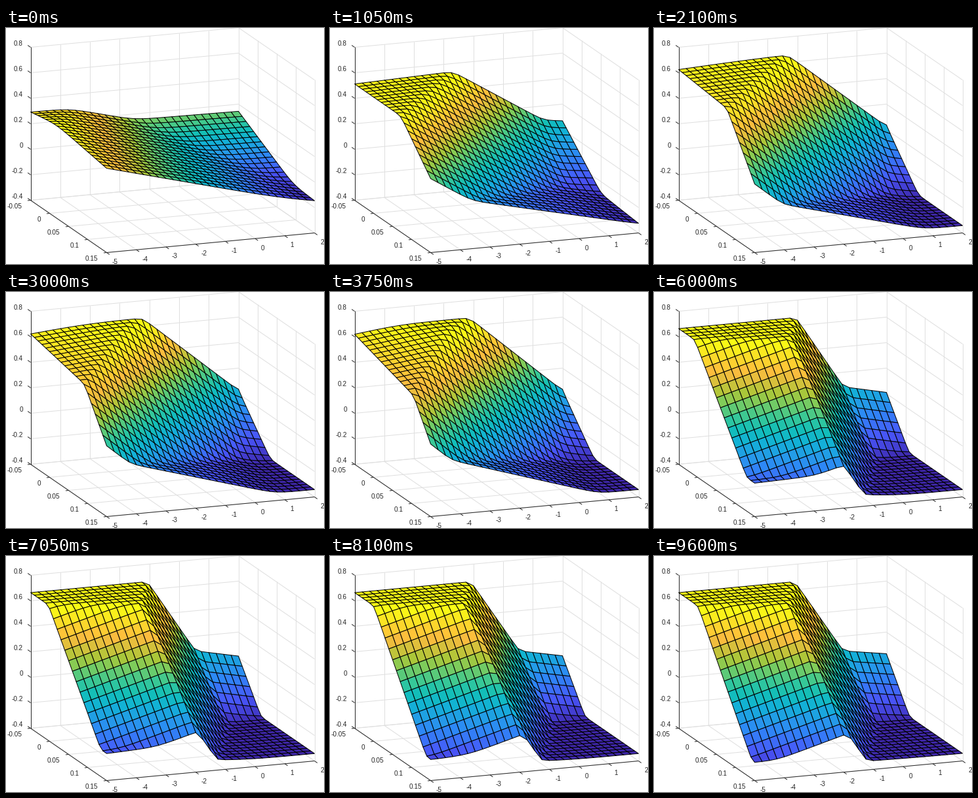
Write a matplotlib script that moves like this. It is 485 px wide and 361 px high and loops after 9.75 s.

```python
import matplotlib.pyplot as plt
import numpy as np
from matplotlib.animation import FuncAnimation
from matplotlib.collections import LineCollection, PolyCollection
from matplotlib.colors import LinearSegmentedColormap

W, H, DPI = 485, 361, 64
PX = 72 / DPI
TICK = 50
LOOP = 9750
DARK = "#262626"

PARULA = LinearSegmentedColormap.from_list("parula", [
    (0, (.2422, .1504, .6603)), (1 / 7, (.2810, .3228, .9579)),
    (1 / 6, (.2780, .3556, .9777)), (2 / 7, (.1786, .5289, .9682)),
    (1 / 3, (.1540, .5902, .9218)), (3 / 7, (.0689, .6948, .8394)),
    (1 / 2, (.0704, .7457, .7258)), (4 / 7, (.2161, .7843, .5923)),
    (2 / 3, (.5044, .7993, .3480)), (5 / 7, (.6720, .7793, .2227)),
    (5 / 6, (.9871, .7348, .2438)), (6 / 7, (.9970, .7659, .2199)),
    (1, (.9769, .9839, .0805))])

# The surface is a soft min/max of planes a + b*u + c*v, with
# u = x + 5, v = (y + 0.05) / 0.2 and height measured from z = -0.4.
# Rows: left face, its foot, right face, back patch, front slope.
FLOOR, TOP = .058, 1.064
SHARP = 75
STAGES = [
    (0, [(.692, -.002, .128), (.25, .006, 0), (.771, -.062, -.11),
         (.565, -.003, -.386), (.544, -.038, -.027)]),
    (12, [(1.026, .012, -.07), (.25, .006, 0), (1.754, -.19, -1.216),
          (.711, -.04, -.88), (.507, -.0625, -.09)]),
    (23, [(1.02, .03, -.21), (.25, .006, 0), (1.846, -.203, -1.277),
          (.783, -.051, -.88), (.558, -.074, -.08)]),
    (30, [(.995, .04, -.446), (.25, .006, 0), (2.246, -.286, -1.363),
          (.767, -.051, -.88), (.643, -.099, -.1)]),
    (38, [(1.312, .065, -1.17), (.262, .006, 0), (2.485, -.36, -1.067),
          (.774, -.052, -1.18), (.2, -.03, 0)]),
    (52, [(1.392, .065, -1.3), (.16, .012, 0), (2.448, -.354, -1.05),
          (.751, -.048, -1.2), (.15, -.022, 0)]),
    (62, [(1.396, .065, -1.3), (.142, 0, 0), (2.448, -.354, -1.04),
          (.69, -.037, -1.22), (.1, -.01, 0)]),
]
STEPS = np.array([s for s, _ in STAGES])
PLANES = np.array([p for _, p in STAGES])

# far cells first, so that near ones cover them
U, V = np.meshgrid(np.linspace(7, 0, 29), np.linspace(0, 1, 21))


def project(x, y, z):
    u, v = x + 5, (y + .05) / .2
    return np.stack([37 + 317 / 7 * u + 116 * v,
                     263 - 30 / 7 * u + 80 * v - 195 * (z + .4)], axis=-1)


def smax(*parts):
    full = np.broadcast_arrays(*parts)
    return np.logaddexp.reduce(np.array(full) * SHARP, axis=0) / SHARP


def smin(*parts):
    return -smax(*[-p for p in parts])


def step_at(ms):
    if ms < 600:
        return int(ms >= 400)
    return 2 + (ms - 600) // 150


def planes_at(step):
    k = min(np.searchsorted(STEPS, step, side="right") - 1, len(STEPS) - 2)
    t = (step - STEPS[k]) / (STEPS[k + 1] - STEPS[k])
    if k == 0:
        t = 1 - (1 - t) ** 2
    return PLANES[k] * (1 - t) + PLANES[k + 1] * t


def surface(step):
    left, foot, right, back, front = (
        a + b * U + c * V for a, b, c in planes_at(step))
    hill = smin(TOP + 0 * U, smax(left, foot), right)
    return smax(hill, back, front, FLOOR) - .4


def draw_axes(ax):
    xs = np.arange(-5, 3)
    ys = np.linspace(-.05, .15, 5)
    zs = np.linspace(-.4, .8, 7)

    def lines(ends, color, z):
        segs = [[project(*p) for p in e] for e in ends]
        ax.add_collection(LineCollection(
            segs, colors=color, linewidths=PX, zorder=z))

    grid = []
    for x in xs:
        grid += [[(x, .15, -.4), (x, -.05, -.4)], [(x, -.05, -.4), (x, -.05, .8)]]
    for y in ys:
        grid += [[(-5, y, -.4), (2, y, -.4)], [(2, y, -.4), (2, y, .8)]]
    for z in zs:
        grid += [[(-5, -.05, z), (2, -.05, z)], [(2, -.05, z), (2, .15, z)]]
    lines(grid, "#dfdfdf", 1)

    dx, dy = .1, .0075
    rules = [[(-5, -.05, -.4), (-5, -.05, .8)], [(-5, -.05, -.4), (-5, .15, -.4)],
             [(-5, .15, -.4), (2, .15, -.4)]]
    rules += [[(x, .15, -.4), (x, .15 + dy, -.4)] for x in xs]
    rules += [[(-5, y, -.4), (-5 - dx, y, -.4)] for y in ys]
    rules += [[(-5, -.05, z), (-5, -.05 - dy, z)] for z in zs]
    lines(rules, DARK, 2)

    def label(value, point, shift, ha):
        px, py = project(*point) + shift
        ax.text(px, py, f"{round(value, 2) + 0:g}", ha=ha, va="center_baseline",
                family="Liberation Sans", size=10 * PX, color=DARK)

    for x in xs:
        label(x, (x, .15, -.4), (8.5, 13.5), "left")
    for y in ys:
        label(y, (-5, y, -.4), (-13, 8), "right")
    for z in zs:
        label(z, (-5, -.05, z), (-11.5, -6.5), "right")


fig = plt.figure(figsize=(W / DPI, H / DPI), dpi=DPI, facecolor="white")
ax = fig.add_axes([0, 0, 1, 1])
ax.set(xlim=(-.5, W - .5), ylim=(H - .5, -.5))
ax.axis("off")
draw_axes(ax)
mesh = PolyCollection([], cmap=PARULA, edgecolors="black", linewidths=PX,
                      joinstyle="round", zorder=3)
ax.add_collection(mesh)


def update(i):
    z = surface(step_at(i * TICK))
    p = project(U - 5, V * .2 - .05, z)
    quads = np.stack([p[:-1, :-1], p[:-1, 1:], p[1:, 1:], p[1:, :-1]], axis=2)
    mesh.set_verts(quads.reshape(-1, 4, 2))
    mesh.set_array(z[:-1, 1:].ravel())
    mesh.set_clim(z.min(), z.max())
    return [mesh]


anim = FuncAnimation(fig, update, frames=LOOP // TICK, interval=TICK,
                     repeat=True, repeat_delay=0, blit=False)
plt.show()
```
